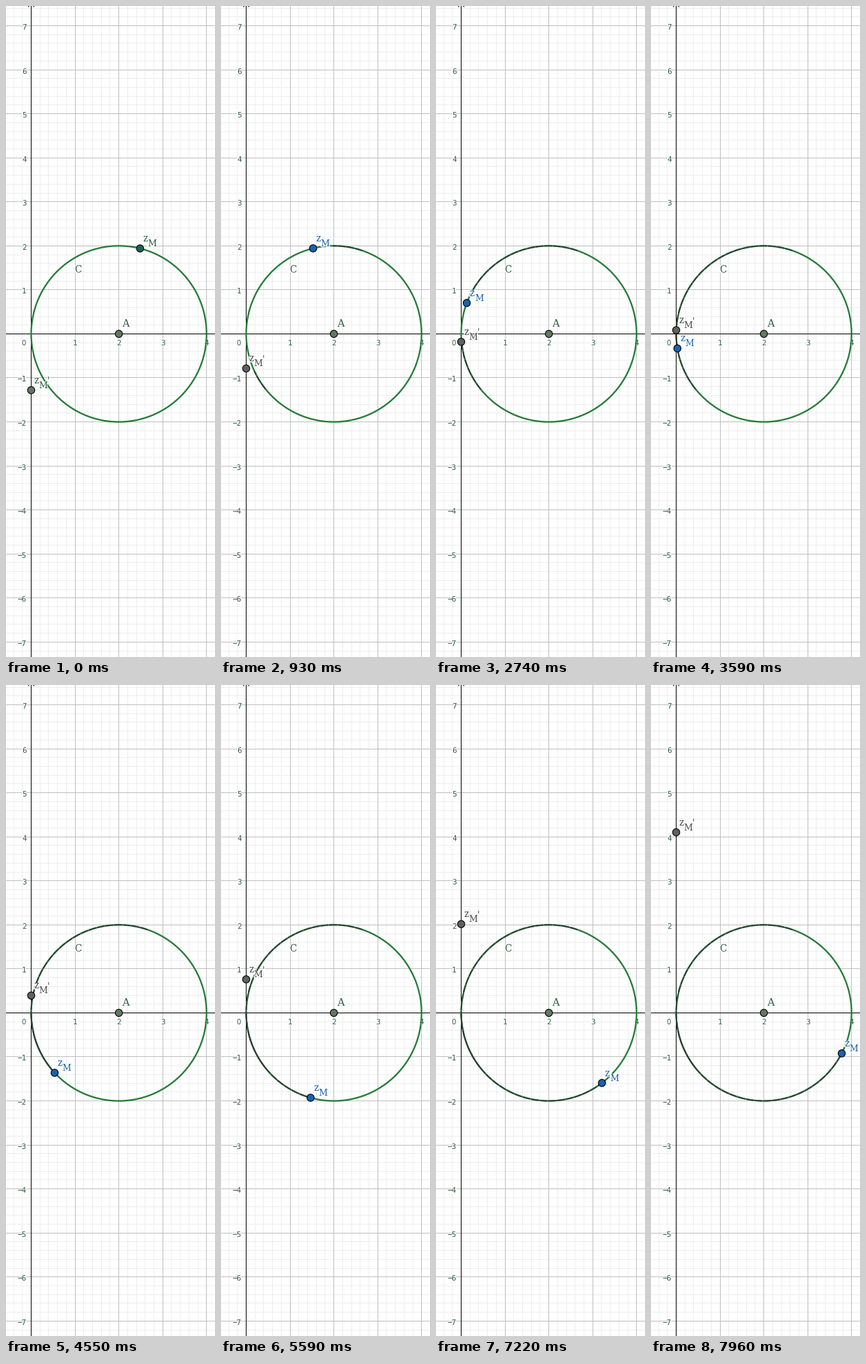
Recreate the animation shown at these times as a matplotlib script. Size 303 by 940 pixels, loop 7.99 s.

```python
import math

import numpy as np
import matplotlib.pyplot as plt
from matplotlib.animation import FuncAnimation
from matplotlib.patches import Circle
from matplotlib.patheffects import withStroke

W, H = 303, 940
OX, OY, UNIT = 36.5, 473.43, 63.56
CX, CY, R = OX + 2 * UNIT, OY, 2 * UNIT
LOOP, STEP = 7990, 34
TICK = 30  # the point moves in small jumps of this many ms

GREEN, DARK = "#247c37", "#2f3d38"
TEXT, BLUE, GREY = "#2b5a41", "#1a62a8", "#4a4a4a"

# Angle of the moving point (degrees) over time (ms), with short rests.
KEYS = [
    (0, 76), (50, 77.2), (835, 100.8), (1610, 125.7), (1660, 126.9),
    (1830, 133.9), (2455, 150.3), (3265, 177.8), (3590, 189.5), (3690, 190.7),
    (4070, 204.4), (4550, 222.9), (4650, 224.1), (4880, 232.3), (5590, 254.6),
    (5680, 258.6), (6400, 283.3), (6460, 286), (6560, 287.2), (7350, 311.2),
    (7960, 332.6),
]
RESTS = [(0, 50), (1610, 1660), (3590, 3690), (4550, 4650), (6460, 6560)]
TIMES, ANGLES = zip(*KEYS)

plt.rcParams["toolbar"] = "None"
# At 72 dpi one point equals one pixel.
fig = plt.figure(figsize=((W + 0.01) / 72, (H + 0.01) / 72), dpi=72,
                 facecolor="white")
ax = fig.add_axes([0, 0, 1, 1])
ax.set_xlim(0, W)
ax.set_ylim(H, 0)
ax.axis("off")


def pixel(v):
    return math.floor(v) + 0.5


def rules(xs, ys, color, z):
    style = dict(color=color, lw=1, zorder=z, snap=False)
    ax.vlines([x for x in map(pixel, xs) if 0 < x < W], 0, H, **style)
    ax.hlines([y for y in map(pixel, ys) if 0 < y < H], 0, W, **style)


def grid(ks, div, color, z):
    rules([OX + k * UNIT / div for k in ks],
          [OY + k * UNIT / div for k in ks], color, z)


class Label:
    """Text pieces with a white halo below all of their ink."""

    def __init__(self, parts, color=TEXT, z=6, halo=2.5, **font):
        self.parts = []
        for text, dx, dy, size in parts:
            style = dict(fontsize=size, **font)
            back = ax.text(0, 0, text, color="white", zorder=z,
                           path_effects=[withStroke(linewidth=halo,
                                                    foreground="white")],
                           **style)
            ink = ax.text(0, 0, text, color=color, zorder=z + 0.5, **style)
            self.parts.append((back, ink, dx, dy))

    def move(self, x, y, color=None):
        for back, ink, dx, dy in self.parts:
            back.set_position((x + dx, y + dy))
            ink.set_position((x + dx, y + dy))
            if color:
                ink.set_color(color)


def dot(x, y, color, z):
    return ax.add_patch(Circle((x, y), 5.2, fc=color, ec="black", lw=1.1,
                               zorder=z))


def arc(a, b):
    t = np.radians(np.linspace(a, b, max(2, int(abs(b - a)) + 2)))
    return CX + R * np.cos(t), CY - R * np.sin(t)


# Grid and axes
grid([k for k in range(-38, 39) if k % 5], 5, "#eeeeee", 0)
grid(range(-8, 9), 1, "#c0c0c0", 1)
rules([OX], [OY], "black", 2)
ax.plot([32.5, OX, 40.5], [1, -4, 1], color="black", lw=1, zorder=2)

# Axis numbers
mono = dict(family="DejaVu Sans Mono", va="center_baseline", z=2.2, halo=2)
for n in range(-7, 8):
    if n:
        text = str(n).replace("-", "\u2212")
        Label([(text, 0, 0, 11)], ha="right", **mono).move(
            29.8, OY - n * UNIT + 1.5)
for n in range(1, 5):
    Label([(str(n), 0, 0, 11)], ha="center", **mono).move(OX + n * UNIT, 486)
Label([("0", 0, 0, 10)], ha="center", family="DejaVu Sans",
      va="center_baseline", z=2.2, halo=2).move(25.5, 486)

# Circle and its worn stretches
ax.plot(*arc(0, 360), color=GREEN, lw=2.3, zorder=3)
worn = [ax.plot([], [], color=DARK, lw=1.8, zorder=4, dash_capstyle="butt",
                linestyle=(0, (6, 1)))[0] for _ in range(2)]

serif = dict(family="DejaVu Serif", ha="left", va="baseline")
Label([("C", 0, 0, 13.5)], **serif).move(99.5, 385)
Label([("A", 0, 0, 14.5)], **serif).move(167.8, 463)
dot(CX, CY, "#5f7a5f", 8)

name = [("z", 4.3, -10, 13.5), ("M", 11.3, -3, 12.5)]
label_m = Label(name, **serif)
label_p = Label(name + [("'", 22.8, -9.5, 13)], **serif)
dot_m = dot(0, 0, BLUE, 8)
dot_p = dot(0, 0, GREY, 9)


def angle_at(t):
    """Angle at time t, moving in jumps and standing still during rests."""
    start = max(k for k in TIMES if k <= t)
    if any(a <= t < b for a, b in RESTS):
        t = start
    return np.interp(start + (t - start) // TICK * TICK, TIMES, ANGLES)


def draw(i):
    t = i * STEP + 28  # sample late, so that a jump within the frame shows
    deg = angle_at(t)
    a = math.radians(deg)
    x, y = CX + R * math.cos(a), CY - R * math.sin(a)
    py = OY + UNIT / math.tan(a / 2)
    first = t < 50

    dot_m.center = (x, y)
    dot_m.set_facecolor("#10675a" if first else "#1763b0")
    label_m.move(x, y, TEXT if first else BLUE)

    dot_p.center = (OX, py)
    dot_p.set_facecolor("#5f7a5f" if first else "#606060")
    label_p.move(OX, py, TEXT if first else GREY)

    # The circle darkens wherever a label or a dot has passed over it.
    end = deg - np.interp(deg, [140, 180], [13, 2])
    worn[0].set_data(*(arc(71, end) if end > 71 else ([], [])))
    drop = min(max(py + 4 - CY, 0), R)
    low = 180 + math.degrees(math.asin(drop / R))
    worn[1].set_data(*(arc(219, low) if low < 217 else ([], [])))
    return [dot_m, dot_p, *worn]


anim = FuncAnimation(fig, draw, frames=LOOP // STEP, interval=STEP,
                     init_func=lambda: draw(0), repeat=True, repeat_delay=0,
                     blit=False)
plt.show()
```
